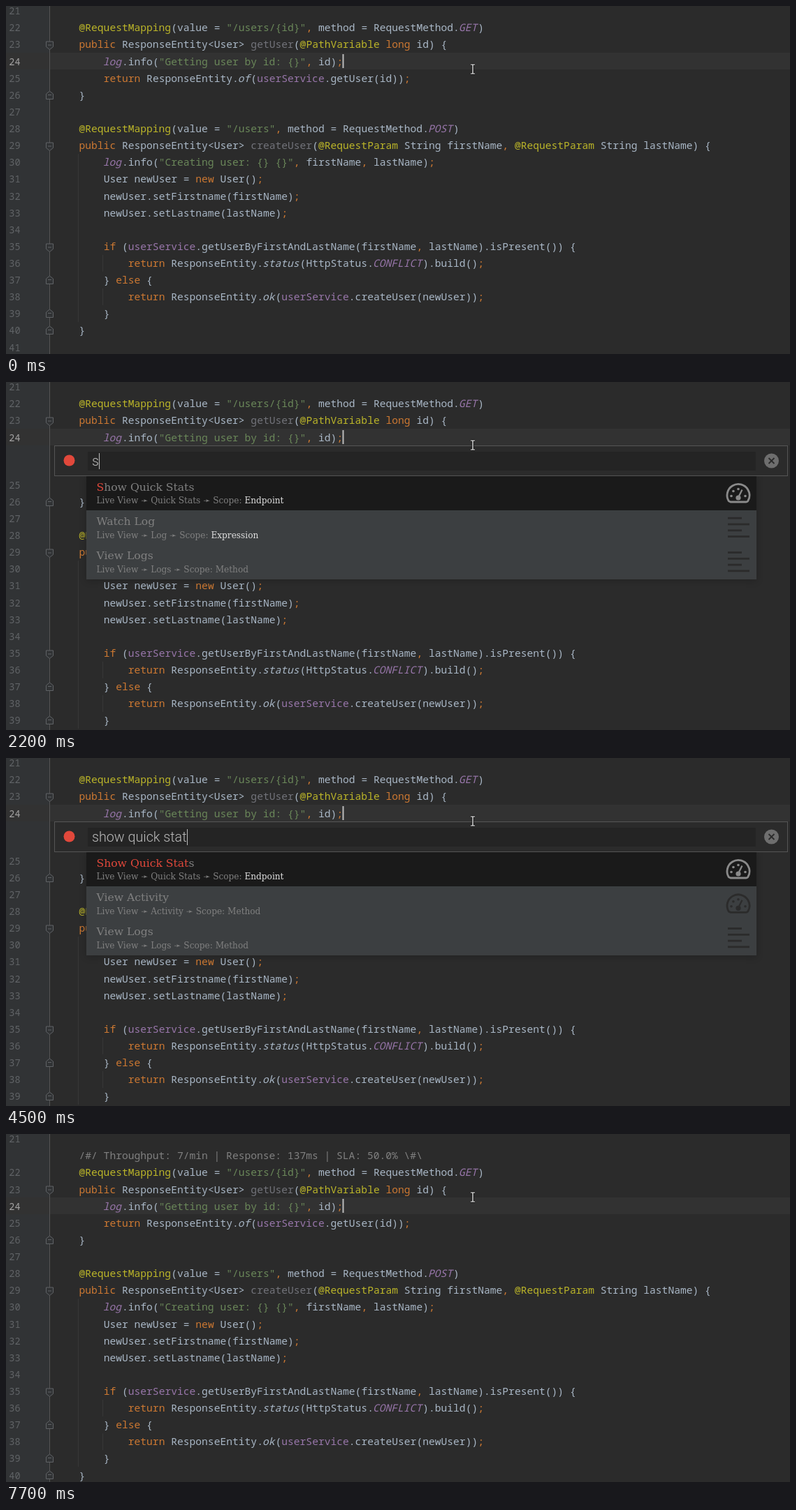
Animation of 1122 by 499 pixels, one loop 8000 ms. Source, as an HTML page with a canvas:

```html
<!DOCTYPE html>
<html lang="en">
<head>
<meta charset="utf-8">
<title>Editor command palette</title>
<style>
  html, body { margin: 0; width: 100%; height: 100%; overflow: hidden; background: #2b2b2b; }
  canvas { display: block; }
</style>
</head>
<body>
<canvas id="stage" width="1122" height="499"></canvas>
<script>
const ctx = document.getElementById('stage').getContext('2d');
const LOOP = 8000, WIDTH = 1122, HEIGHT = 499;
const ROW = 24.12, CHAR = 8.78;
const MONO = '14.63px "Noto Sans Mono", "DejaVu Sans Mono", monospace';
const NUMBERS = '13.6px "Noto Sans Mono", "DejaVu Sans Mono", monospace';
const TITLE = '15.6px "DejaVu Serif", serif';
const DETAIL = '12.13px "DejaVu Serif", serif';
const INPUT = '300 19.7px Roboto, sans-serif';
const RED = '#e1483b', GRAY = '#808080', EDITOR = '#2b2b2b';

const FIRST_LINE = 21;
const code = String.raw`
    @RequestMapping(value = "/users/{id}", method = RequestMethod.GET)
    public ResponseEntity<User> getUser(@PathVariable long id) {
        log.info("Getting user by id: {}", id);
        return ResponseEntity.of(userService.getUser(id));
    }

    @RequestMapping(value = "/users", method = RequestMethod.POST)
    public ResponseEntity<User> createUser(@RequestParam String firstName, @RequestParam String lastName) {
        log.info("Creating user: {} {}", firstName, lastName);
        User newUser = new User();
        newUser.setFirstname(firstName);
        newUser.setLastname(lastName);

        if (userService.getUserByFirstAndLastName(firstName, lastName).isPresent()) {
            return ResponseEntity.status(HttpStatus.CONFLICT).build();
        } else {
            return ResponseEntity.ok(userService.createUser(newUser));
        }
    }
`.split('\n');

const syntax = [
  [/^@\w+/, '#bbb529'],
  [/^"[^"]*"/, '#6a8759'],
  [/^(public|long|return|new|if|else)\b|^[,;]/, '#cc7832'],
  [/^(log|GET|POST|CONFLICT)\b/, '#9876aa', true],
  [/^userService\b/, '#9876aa'],
  [/^(of|status|ok)\b/, '#a9b7c6', true],
  [/^(\w+|[^\w\s@",;]|\s+)/, '#a9b7c6'],
];

function tokenize(line) {
  const tokens = [];
  for (let col = 0; col < line.length;) {
    const rest = line.slice(col);
    const [pattern, color, italic] = syntax.find(([p]) => p.test(rest));
    const text = rest.match(pattern)[0];
    const declared = line.slice(0, col).endsWith('<User> ');
    tokens.push({ text, col, italic, color: declared ? '#72737a' : color });
    col += text.length;
  }
  return tokens;
}
const lines = code.map(tokenize);

// [start ms, typed text, second result, third result]
const queries = [
  [1300, ''],
  [2100, 's'],
  [2200, 's', 'watch', 'logs'],
  [2400, 'sho', 'logs', 'activity'],
  [2900, 'show ', 'logs', 'watch'],
  [3000, 'show q', 'logs', 'activity'],
  [3300, 'show qu', 'logs', 'activity'],
  [3500, 'show qui', 'traces', 'activity'],
  [3600, 'show quic', 'traces', 'activity'],
  [3700, 'show quick', 'traces', 'activity'],
  [3800, 'show quick ', 'traces', 'activity'],
  [4000, 'show quick s', 'activity', 'watch'],
  [4300, 'show quick st', 'traces', 'logs'],
  [4500, 'show quick stat', 'activity', 'logs'],
  [4800, 'show quick stats', 'activity', 'logs'],
];
const commands = {
  stats: ['Show Quick Stats', 'Quick Stats', 'Endpoint', gauge],
  logs: ['View Logs', 'Logs', 'Method', bars],
  watch: ['Watch Log', 'Log', 'Expression', bars],
  traces: ['View Traces', 'Traces', 'Method', brackets],
  activity: ['View Activity', 'Activity', 'Method', gauge],
};

const within = (t, spans) => spans.some(([from, to]) => t >= from && t < to);
const editorCaret = t => !within(t, [[200, 700], [1100, 1300], [6000, 6100], [7100, 7700]]);
const inputCaret = t => !within(t, [[1300, 1400], [1800, 2100], [5300, 5900]]);

function rect(x, y, w, h, color) {
  ctx.fillStyle = color;
  ctx.fillRect(x, y, w, h);
}

// Draws text and returns the x position after it.
function write(text, x, y, font, color) {
  ctx.font = font;
  ctx.fillStyle = color;
  ctx.fillText(text, x, y);
  return x + ctx.measureText(text).width;
}

function poly(points, closed) {
  ctx.beginPath();
  points.forEach(([x, y]) => ctx.lineTo(x, y));
  if (closed) ctx.closePath();
}

function disc(x, y, r, color) {
  ctx.fillStyle = color;
  ctx.beginPath();
  ctx.arc(x, y, r, 0, 7);
  ctx.fill();
}

function gauge(x, y, color) {
  ctx.strokeStyle = color;
  ctx.lineWidth = 2.8;
  ctx.beginPath();
  ctx.arc(x, y + 3, 16, 2.6, Math.PI * 2 + 0.54);
  ctx.quadraticCurveTo(x + 12.5, y + 12.5, x + 11, y + 12.5);
  ctx.lineTo(x - 11, y + 12.5);
  ctx.closePath();
  ctx.stroke();
  for (const a of [0, 0.25, 0.5, 1]) {
    disc(x - 10 * Math.cos(a * Math.PI), y + 4 - 10 * Math.sin(a * Math.PI), 1.8, color);
  }
  disc(x, y + 6.5, 3.6, color);
  poly([[x, y + 6], [x + 5.5, y - 5]]);
  ctx.lineWidth = 2.3;
  ctx.stroke();
}

function bars(x, y, color) {
  for (let i = 0; i < 4; i++) rect(x - 15, y - 15 + i * 8.8, i % 2 ? 31 : 20, 2.8, color);
}

function brackets(x, y, color) {
  ctx.strokeStyle = color;
  ctx.lineWidth = 2.8;
  for (const s of [-1, 1]) {
    poly([[x + s * 9, y - 8], [x + s * 16, y], [x + s * 9, y + 8]]);
    ctx.stroke();
  }
  poly([[x + 4, y - 13], [x - 4, y + 13]]);
  ctx.stroke();
}

function foldMark(y, opens) {
  const s = opens ? 1 : -1, mid = y + (opens ? 1.5 : 0);
  poly([[57.5, mid - 5.5 * s], [67.5, mid - 5.5 * s], [67.5, mid + 2 * s],
        [62.5, mid + 6 * s], [57.5, mid + 2 * s]], true);
  ctx.fillStyle = '#313335';
  ctx.fill();
  ctx.strokeStyle = '#606366';
  ctx.lineWidth = 1;
  ctx.stroke();
  rect(60, mid - 1, 5, 1, '#606366');
}

function drawEditor(t, popupOpen, hintShown) {
  const center = n => 7 + (n - FIRST_LINE) * ROW
    + (popupOpen && n > 24 ? 44 : 0) + (hintShown && n > 21 ? ROW : 0);
  rect(0, 0, WIDTH, HEIGHT, EDITOR);
  rect(0, 0, 62, HEIGHT, '#313335');
  const current = center(24);
  rect(0, Math.round(current - 12), WIDTH, 24, '#323232');

  rect(103, center(30) - 12, 1, center(39) - center(30) + 24, '#373737');
  for (const n of [36, 38]) rect(138, center(n) - 12, 1, 24, '#373737');
  rect(62, 0, 1, HEIGHT, '#555555');
  for (const n of [23, 29, 35]) foldMark(Math.round(center(n)), true);
  for (const n of [26, 37, 39, 40]) foldMark(Math.round(center(n)), false);

  lines.forEach((tokens, i) => {
    const n = FIRST_LINE + i, base = center(n) + 5.2;
    write(n, 4.3, base, NUMBERS, n === 24 ? '#a4a3a3' : '#606366');
    for (const { text, col, italic, color } of tokens) {
      const x = 69.4 + col * CHAR;
      if (italic) write(text, x - 1, base, 'italic ' + MONO, color);
      else write(text, x, base, MONO, color);
    }
  });
  if (hintShown) {
    write('/#/ Throughput: 7/min | Response: 137ms | SLA: 50.0% \\#\\',
      104.5, 7 + ROW + 5.2, MONO, GRAY);
  }
  if (editorCaret(t)) rect(481.5, Math.round(current) - 10, 2, 20, '#bbbbbb');
}

function drawShadow() {
  ctx.save();
  ctx.beginPath();
  ctx.rect(0, 135, WIDTH, HEIGHT);
  ctx.rect(115, 135, 959, 148);
  ctx.clip('evenodd');
  ctx.shadowColor = 'rgba(0,0,0,.2)';
  ctx.shadowBlur = 10;
  ctx.shadowOffsetY = 2;
  rect(115, 135, 959, 148, '#000');
  ctx.restore();
}

function drawResults(keys, matched) {
  rect(115, 135, 959, 148, '#3c3f41');
  rect(115, 135, 959, 49, '#1a1a1a');
  keys.forEach((key, i) => {
    const [title, topic, scope, icon] = commands[key];
    const y = 135 + i * 49.3, hits = i ? 0 : matched;
    const x = write(title.slice(0, hits), 129.5, y + 20.7, TITLE, RED);
    write(title.slice(hits), x, y + 20.7, TITLE, GRAY);
    const end = write(`Live View ➛ ${topic} ➛ Scope: `, 129.5, y + 39.3, DETAIL, GRAY);
    write(scope, end, y + 39.3, DETAIL, scope === 'Method' ? GRAY : '#e0e0e0');
    icon(1048, y + 24.5, i ? '#2b2b2b' : '#8a8a8a');
  });
}

function drawPopup(t) {
  const [start, typed, second, third] = queries.findLast(q => t >= q[0]);
  if (start >= 2100) drawShadow();
  if (second) drawResults(['stats', second, third], typed.trimEnd().length);

  rect(69, 91, 1050, 44, '#555555');
  rect(70, 92, 1048, 42, EDITOR);
  rect(117, 100, 956, 27, '#242424');
  disc(90.5, 112.5, 8, RED);
  disc(1095.5, 113, 10.5, '#6e6e6e');
  ctx.strokeStyle = EDITOR;
  ctx.lineWidth = 1.8;
  for (const s of [-1, 1]) {
    poly([[1091.5, 113 - 4 * s], [1099.5, 113 + 4 * s]]);
    ctx.stroke();
  }
  const complete = typed.length === commands.stats[0].length;
  const end = write(typed, 123, 120, INPUT, complete ? RED : '#bbbbbb');
  if (inputCaret(t)) rect(Math.round(end), 102, 1, 23, '#bbbbbb');
}

function drawPointer() {
  const beam = [[665, 84], [671, 84], [668, 84], [668, 97], [665, 97], [671, 97]];
  for (const [width, color] of [[3, '#111111'], [1.2, '#ffffff']]) {
    poly(beam);
    ctx.lineWidth = width;
    ctx.strokeStyle = color;
    ctx.stroke();
  }
}

function frame(now) {
  const t = now % LOOP;
  const popupOpen = t >= 1300 && t < 6000;
  drawEditor(t, popupOpen, t >= 6400);
  if (popupOpen) drawPopup(t);
  drawPointer();
  requestAnimationFrame(frame);
}
requestAnimationFrame(frame);
</script>
</body>
</html>
```
